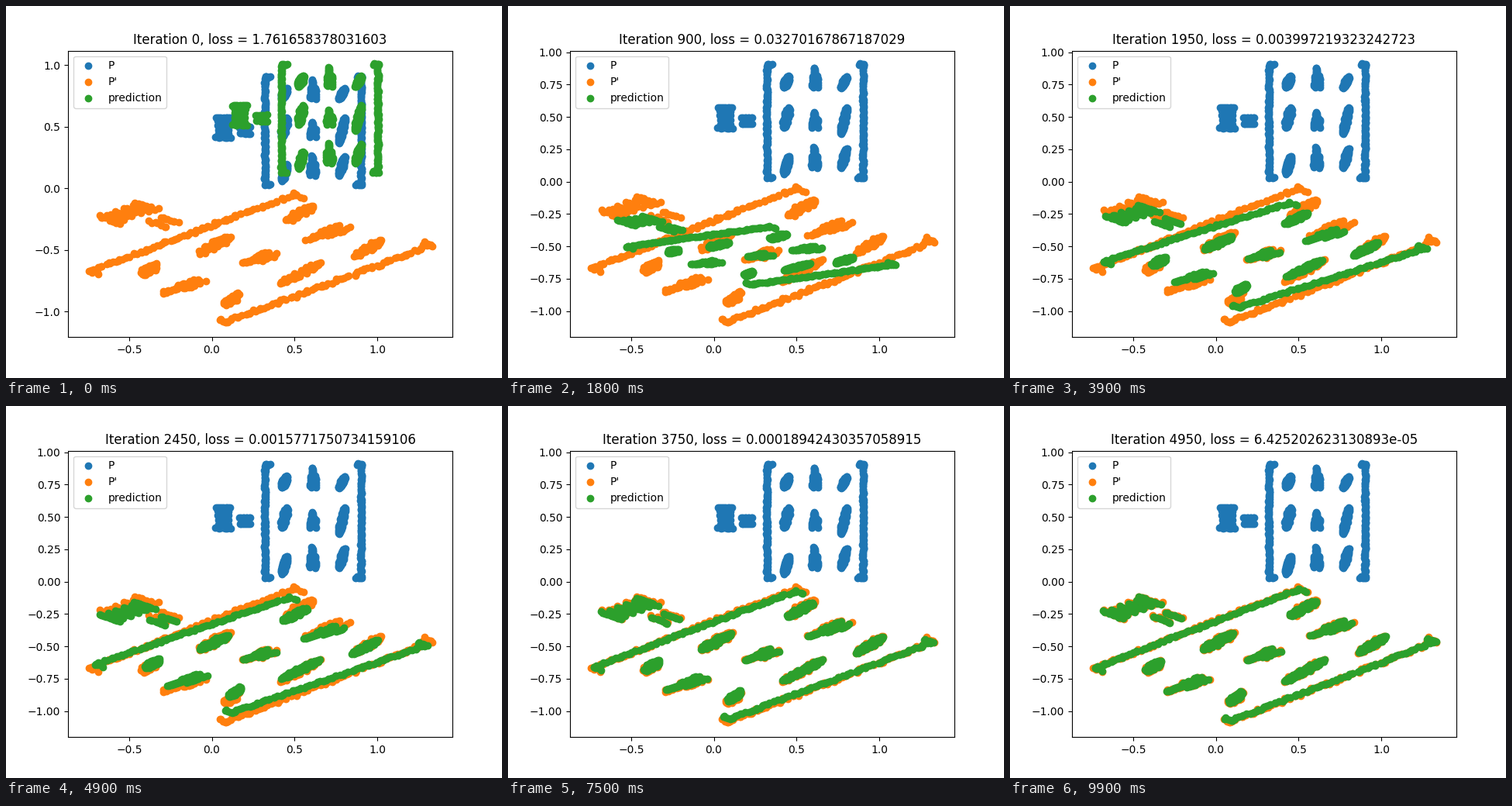
These frames come from a looping animation (640 by 480 pixels, 10 s). A matplotlib script:

```python
import numpy as np
import matplotlib.pyplot as plt
from matplotlib.animation import FuncAnimation

FRAMES, INTERVAL, STEP = 100, 100, 50
DECAY = 0.00089  # per-iteration decay of the slowest error mode
rng = np.random.default_rng(4)


def stroke(*pts, gap=0.01, spread=0.005):
    """Slightly thick polyline made of dots."""
    pts = np.array(pts)
    parts = []
    for a, b in zip(pts[:-1], pts[1:]):
        n = int(np.hypot(*(b - a)) / gap) + 2
        parts.append(np.linspace(a, b, n))
    line = np.vstack(parts)
    return line + rng.uniform(-spread, spread, line.shape)


def bracket(x, hook):
    top, bottom = .907, .033
    return stroke((x + hook, top), (x, top), (x, bottom), (x + hook, bottom))


def bar(x0, x1, y):
    return stroke((x0, y), (x1, y), spread=.002)


def glyph(x, bottom, top, width, lean, profile, n=32):
    """Upright blob of dots with a width profile along its height."""
    v = np.linspace(0, 1, n)
    side = width * profile(v) * rng.uniform(.4, 1, n) * (-1) ** np.arange(n)
    return np.column_stack([x + lean * (v - .5) + side,
                            bottom + (top - bottom) * v])


def oval(v):
    return np.sqrt(4 * v * (1 - v))


def pear(v):
    return np.where(v < .6, 1, .15)


# x, width, lean, profile, vertical spans
COLUMNS = [
    (.438, .018, .026, oval, [(.725, .815), (.415, .572), (.06, .197)]),
    (.609, .022, -.006, pear, [(.725, .88), (.415, .537), (.105, .265)]),
    (.785, .014, .034, oval, [(.722, .812), (.367, .575), (.105, .257)]),
]


def build_cloud():
    parts = [bracket(.321, .03), bracket(.903, -.03)]
    parts += [bar(.025, .112, y) for y in (.414, .572)]
    parts += [bar(.037, .1, y) for y in np.linspace(.44, .546, 4)]
    parts += [bar(.167, .234, y) for y in (.446, .494)]
    for x, width, lean, profile, spans in COLUMNS:
        parts += [glyph(x, *span, width, lean, profile) for span in spans]
    return np.vstack(parts)


P = build_cloud()
X = np.column_stack([P, np.ones(len(P))])

# affine maps as 3x2 matrices acting on (x, y, 1)
R = np.sqrt(.5)
START = np.array([[1, 0], [0, 1], [.1, .1]])
GOAL = np.array([[2 * R, -R], [-2 * R, -R], [.092, .2]])
Q = X @ GOAL + rng.normal(0, .005, P.shape)

# gradient descent in closed form: each eigenmode shrinks geometrically
modes, basis = np.linalg.eigh(X.T @ X / len(X))
RATES = 1 - DECAY * modes / modes[0]


def predict(t):
    shrink = basis @ np.diag(RATES ** t) @ basis.T
    return X @ (GOAL + shrink @ (START - GOAL))


def loss(pred):
    return float(np.mean(np.sum((pred - Q) ** 2, axis=1)))


fig, ax = plt.subplots(figsize=(6.4, 4.8), dpi=100)
ax.scatter(*P.T, label="P")
ax.scatter(*Q.T, label="P'")
dots = ax.scatter(*predict(0).T, label="prediction")
ax.legend(loc="upper left")
ax.set_xlim(-.869, 1.454)


def update(i):
    t = i * STEP
    pred = predict(t)
    dots.set_offsets(pred)
    low, high = -1.1, max(P[:, 1].max(), pred[:, 1].max())
    pad = .05 * (high - low)
    ax.set_ylim(low - pad, high + pad)
    ax.set_title(f"Iteration {t}, loss = {loss(pred)}")
    return dots,


anim = FuncAnimation(fig, update, frames=FRAMES, interval=INTERVAL,
                     repeat=True, repeat_delay=0)
plt.show()
```
